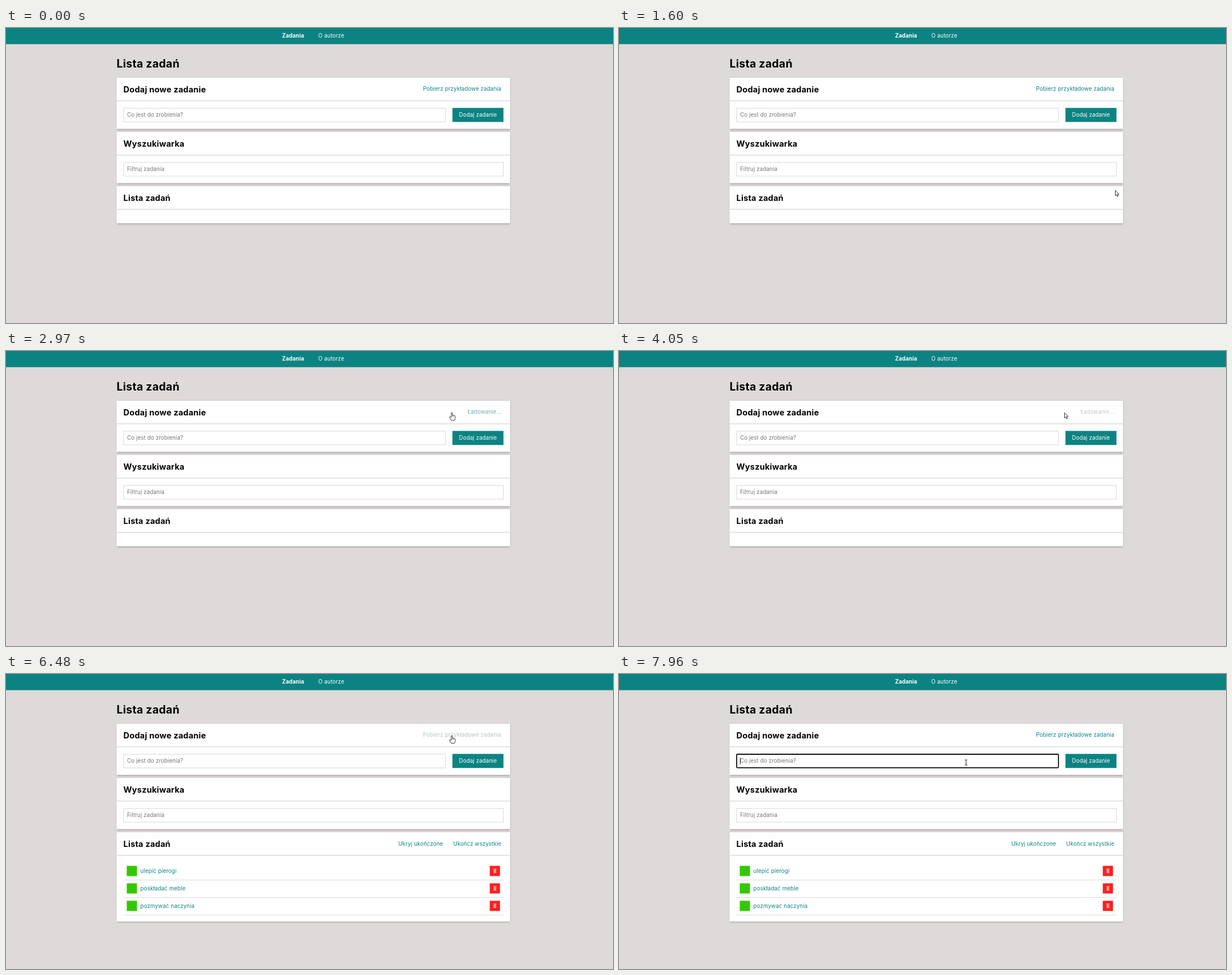
These frames come from a looping animation (1073 by 522 pixels, 8 s). An HTML page with a canvas:

```html
<!DOCTYPE html>
<html lang="pl">
<head>
<meta charset="utf-8">
<title>Lista zadań</title>
<style>
  html, body { margin: 0; width: 100%; height: 100%; overflow: hidden; background: #dddad9; }
  canvas { display: block; width: 1073px; height: 522px; }
</style>
</head>
<body>
<canvas id="stage"></canvas>
<script>
const W = 1073, H = 522, LOOP = 8000, TICK = 69.5;
const TEAL = [12, 131, 130], HOVER = [26, 148, 147], OFF = [197, 199, 203];
const LINE = '#dedede', GREY = '#757575', FONT = 'Inter, "Open Sans", sans-serif';
const LOAD = 2820, READY = 6400, LISTED = 6480, FOCUS = 7760;

// Pointer path: time, x, y
const PATH = [
  [1090, 1058, 512], [1448, 928, 372], [1586, 877, 287], [1865, 820, 179],
  [2281, 794, 121], [2500, 789, 111], [2698, 787, 108.5], [6870, 787, 108.5],
  [7146, 676, 140], [7285, 620, 155], [7354, 613.5, 156.5]
];

const canvas = document.getElementById('stage');
const ctx = canvas.getContext('2d');
const dpr = window.devicePixelRatio || 1;
canvas.width = W * dpr;
canvas.height = H * dpr;

const clamp = v => Math.max(0, Math.min(1, v));
const mix = (a, b, k) => a.map((v, i) => v + (b[i] - v) * k);
const rgb = c => `rgb(${c.map(Math.round)})`;
const fade = (t, start, length = 300) => {
  const k = clamp((t - start) / length);
  return k * k * (3 - 2 * k);
};

function rect(x, y, w, h, color) {
  ctx.fillStyle = color;
  ctx.fillRect(x, y, w, h);
}

function text(str, x, y, color, { size = 9.7, weight = 400, align = 'left' } = {}) {
  ctx.font = `${weight} ${size}px ${FONT}`;
  ctx.letterSpacing = `${size * 0.015}px`;
  ctx.textAlign = align;
  ctx.fillStyle = color;
  ctx.fillText(str, x, y);
}

const title = (str, x, y, size = 14.5) => text(str, x, y, '#000', { size, weight: 700 });

function card(y, h, heading) {
  ctx.save();
  ctx.shadowColor = 'rgba(0,0,0,.28)';
  ctx.shadowBlur = 3 * dpr;
  ctx.shadowOffsetY = dpr;
  rect(195.5, y, 695.5, h, '#fff');
  ctx.restore();
  rect(195.5, y + 40, 695.5, 1.6, LINE);
  title(heading, 207.6, y + 25.5);
}

function field(y, w, hint) {
  ctx.strokeStyle = LINE;
  ctx.lineWidth = 1.2;
  ctx.strokeRect(207.9, y, w, 24.2);
  text(hint, 214, y + 15.2, GREY);
}

function linkColor(t) {
  if (t < LOAD) return mix(TEAL, HOVER, fade(t, 2300));
  if (t < LISTED) return mix(HOVER, OFF, fade(t, LOAD));
  const back = mix([178, 196, 197], HOVER, fade(t, LISTED));
  return mix(back, TEAL, fade(t, 7010));
}

function trash(x, y) {
  rect(x, y, 18, 18, '#ff1f1f');
  rect(x + 6.2, y + 5, 5.6, 1, '#ffd9d9');
  rect(x + 6.8, y + 6.4, 4.4, 6.4, '#ffc4c4');
  rect(x + 8, y + 7, 0.7, 5, '#f05a5a');
  rect(x + 9.6, y + 7, 0.7, 5, '#f05a5a');
}

function list() {
  const right = { align: 'right' };
  text('Ukryj ukończone', 772.6, 303.5, rgb(TEAL), right);
  text('Ukończ wszystkie', 875.6, 303.5, rgb(TEAL), right);
  ['ulepić pierogi', 'poskładać meble', 'pozmywać naczynia'].forEach((task, i) => {
    const y = 339.5 + i * 30.9;
    rect(213.5, y, 18, 18, '#33c800');
    text(task, 237.6, y + 12.4, rgb(TEAL));
    trash(855.2, y);
    rect(207.5, y + 24.5, 672, 1.1, LINE);
  });
}

function page(t) {
  rect(0, 0, W, H, '#dddad9');
  rect(0, 0, W, 28.6, rgb(TEAL));
  text('Zadania', 488, 17, '#fff', { weight: 700 });
  text('O autorze', 552, 17, '#fff');
  title('Lista zadań', 195.5, 70.3, 19.4);

  card(88, 90.5, 'Dodaj nowe zadanie');
  const loading = t >= LOAD && t < LISTED;
  text(loading ? 'Ładowanie...' : 'Pobierz przykładowe zadania', 875.6, 111,
    rgb(linkColor(t)), { align: 'right' });
  field(141.9, 569, 'Co jest do zrobienia?');
  const lit = fade(t, 1960, 150) - fade(t, 2140);
  rect(789.2, 141.4, 90.2, 24.9, rgb(mix(TEAL, HOVER, lit)));
  text('Dodaj zadanie', 834.3, 157, '#fff', { align: 'center' });

  card(184, 90.5, 'Wyszukiwarka');
  field(237.9, 671.4, 'Filtruj zadania');

  card(280, t < LISTED ? 65.5 : 158, 'Lista zadań');
  if (t >= LISTED) list();

  if (t >= FOCUS) {
    ctx.strokeStyle = '#101010';
    ctx.lineWidth = 1.8;
    ctx.beginPath();
    ctx.roundRect(208, 142, 568.8, 23.8, 1.5);
    ctx.stroke();
    rect(213.8, 148, 0.9, 11.5, '#000');
  }
}

function pointerAt(t) {
  const now = 1100 + Math.floor((t - 1090) / TICK) * TICK;
  const next = PATH.findIndex(p => p[0] > now);
  if (next < 0) return PATH[PATH.length - 1].slice(1);
  if (next === 0) return PATH[0].slice(1);
  const a = PATH[next - 1], b = PATH[next];
  return mix(a, b, (now - a[0]) / (b[0] - a[0])).slice(1);
}

function outline(d) {
  const p = new Path2D(d);
  ctx.fillStyle = '#fff';
  ctx.fill(p);
  ctx.strokeStyle = '#1c1c24';
  ctx.lineWidth = 0.9;
  ctx.lineJoin = 'round';
  ctx.stroke(p);
}

const arrow = () => outline('M.5 .5V10L2.7 8L4.2 11.5L5.7 10.8L4.2 7.5H7Z');

function hand() {
  outline('M.1 9V1.4Q.1 .4 1.1 .4T2.1 1.4V5Q3.2 4.3 3.9 5.3Q5 4.8 5.6 5.9' +
    'Q7 5.6 7 7V10Q7 12 5.9 14.2H.2Q-.8 12.2-2.7 9.7Q-3.6 8.2-2.6 7.7Q-1.8 7.3-.7 8.4Z');
  rect(2, 5, 0.5, 3, '#1c1c24');
  rect(3.7, 5.6, 0.5, 2.4, '#1c1c24');
}

function beam() {
  rect(-0.5, -4.5, 1, 9, '#222');
  rect(-2.3, -5, 4.6, 0.9, '#222');
  rect(-2.3, 4.1, 4.6, 0.9, '#222');
}

function pointer(t) {
  if (t < 1100) return;
  let [x, y] = pointerAt(t);
  const waiting = t >= 3000 && t < READY;
  if (waiting && t < 4050) y += 1;
  const onLink = x > 730 && x < 880 && y > 98 && y < 119;
  const onButton = x > 789 && x < 880 && y > 141 && y < 166;
  const onField = x > 207 && x < 777 && y > 141 && y < 166;
  ctx.save();
  ctx.translate(x, y);
  if (onField) beam();
  else if (onButton || (onLink && !waiting)) hand();
  else arrow();
  ctx.restore();
}

function draw(now) {
  const t = now % LOOP;
  ctx.setTransform(dpr, 0, 0, dpr, 0, 0);
  page(t);
  pointer(t);
}

let start;
function frame(now) {
  start ??= now;
  draw(now - start);
  requestAnimationFrame(frame);
}
draw(0);
requestAnimationFrame(frame);
</script>
</body>
</html>
```
